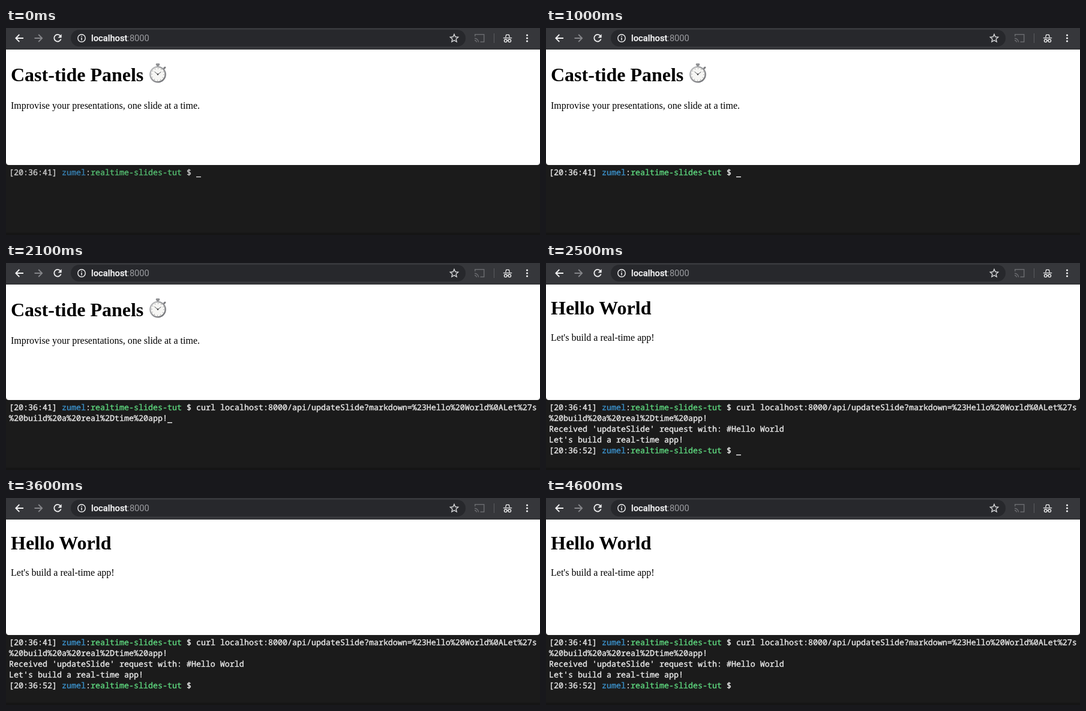
An HTML page for the animation above (4.7 s loop, 890 by 346 pixels).

```html
<!DOCTYPE html>
<html lang="en">
<head>
<meta charset="utf-8">
<title>Live slide update</title>
<style>
  html, body { margin: 0; width: 100%; height: 100%; overflow: hidden; background: #1b1b1b; }
  svg { display: block; width: 890px; height: 346px; }
  text { white-space: pre; }
  .line { fill: none; stroke: #f1f1f2; stroke-width: 1.8; }
  .url { font: 14.65px Roboto, Inter, sans-serif; fill: #9b9ca0; }
  .url tspan { fill: #f4f4f5; stroke: #f4f4f5; stroke-width: .25; font-weight: 500; }
  .page { font: 16px "Liberation Serif", "Times New Roman", serif; }
  .page .title { font-size: 32px; font-weight: bold; }
  .term { font: 500 13.333px "Noto Sans Mono", "DejaVu Sans Mono", monospace; text-rendering: geometricPrecision; }
  .term text, .term tspan { fill: var(--ink); stroke: var(--ink); stroke-width: .4; }
  .term text { --ink: #e8e8e8; }
  .term .user { --ink: #3b8fc7; }
  .term .dir { --ink: #5dd47d; }
</style>
</head>
<body>
<svg viewBox="0 0 890 346">
  <defs>
    <linearGradient id="steel" x1="0" y1="0" x2="1" y2="1">
      <stop offset="0" stop-color="#c3c4c6"/>
      <stop offset="1" stop-color="#6b6c70"/>
    </linearGradient>
  </defs>
  <rect width="890" height="346" fill="#1b1b1b"/>
  <rect y="342" width="890" height="4" fill="#151515"/>

  <g id="toolbar">
    <rect width="890" height="36" fill="#36373b"/>
    <rect y="35" width="890" height="1" fill="#2a2b2e"/>
    <rect x="108" y="3" width="658" height="28" rx="14" fill="#27282c"/>
    <path class="line" d="M29 17H16.5M22.3 11L16.3 17L22.3 23"/>
    <path class="line" d="M47.5 17H60M54.2 11L60.2 17L54.2 23" style="stroke:#85868a"/>
    <path class="line" d="M90.6 13.1A5.8 5.8 0 1 0 91.6 18.5"/>
    <path d="M92.6 10.2V16.2H86.6Z" fill="#f1f1f2"/>
    <circle class="line" cx="126" cy="17" r="6.2" style="stroke-width:1.4"/>
    <path class="line" d="M126 13.2V14.8M126 16V20.6" style="stroke-width:1.5"/>
    <text class="url" x="142" y="22"><tspan>localhost</tspan>:8000</text>
    <path id="star" class="line" style="stroke:#d4d5d7;stroke-width:1.4"/>
    <g class="line" style="stroke:#696a6e;stroke-width:1.5">
      <path d="M781.7 14V10.8H796.7V23.3H790.5"/>
      <path d="M781 17.3A6.5 6.5 0 0 1 787.5 23.8M781 20.5A3.3 3.3 0 0 1 784.3 23.8"/>
    </g>
    <path d="M813.5 9V25" stroke="#5b5c60"/>
    <path class="line" d="M832.6 15.5L833.8 11.4H838.2L839.4 15.5M828.8 16.6H843.2" style="stroke-width:1.3"/>
    <g class="line" style="stroke-width:1.3">
      <circle cx="832.7" cy="21.3" r="2.3"/>
      <circle cx="839.3" cy="21.3" r="2.3"/>
      <path d="M835 20.8Q836 20.1 837 20.8"/>
    </g>
    <path d="M868.5 12V12M868.5 17V17M868.5 22V22" stroke="#f1f1f2" stroke-width="3.2" stroke-linecap="round"/>
  </g>

  <path d="M0 36H890V224Q890 229 885 229H5Q0 229 0 224Z" fill="#fff"/>
  <g class="page" id="firstSlide">
    <text class="title" x="8" y="89">Cast-tide Panels</text>
    <text x="8" y="135">Improvise your presentations, one slide at a time.</text>
    <g id="stopwatch">
      <path d="M253 66V61" stroke="#77787b" stroke-width="3"/>
      <rect x="249.8" y="59.3" width="6.4" height="3.4" rx="1.2" fill="#8f9093"/>
      <path d="M262.5 68.5L265 66" stroke="#77787b" stroke-width="3" stroke-linecap="round"/>
      <circle cx="253" cy="77.6" r="12.7" fill="#f6f6f4" stroke="url(#steel)" stroke-width="2.4"/>
      <circle cx="253" cy="77.6" r="10" fill="none" stroke="#8c8c8c" stroke-width="1.6" stroke-dasharray=".8 4.436"/>
      <path d="M253 77.6L247.5 73M253 77.6L258.5 73.4" stroke="#55565a" stroke-width="1"/>
      <circle cx="253" cy="77.6" r="1.3" fill="#444"/>
    </g>
  </g>
  <g class="page" id="secondSlide">
    <text class="title" x="8" y="86">Hello World</text>
    <text x="8" y="130">Let's build a real-time app!</text>
  </g>

  <g class="term" id="terminal">
    <g id="lines"></g>
    <rect id="cursor" width="8" height="1.6" fill="#d8d8d8"/>
  </g>
</svg>
<script>
const LOOP = 4700, PASTE = 1400, ENTER = 2400, REPLY = 2500;
const CELL = 8, LEFT = 5, ROW = 18, BASELINE = 246;
const $ = id => document.getElementById(id);

const prompt = time =>
  `[${time}] <tspan class="user">zumel</tspan>:<tspan class="dir">realtime-slides-tut</tspan> $ `;

const rows = [
  { row: 0, col: 0, at: 0, html: prompt('20:36:41') },
  { row: 0, col: 39, at: PASTE, html: 'curl localhost:8000/api/updateSlide?markdown=%23Hello%20World%0ALet%27s' },
  { row: 1, col: 0, at: PASTE, html: '%20build%20a%20real%2Dtime%20app!' },
  { row: 2, col: 0, at: REPLY, html: "Received 'updateSlide' request with: #Hello World" },
  { row: 3, col: 0, at: REPLY, html: "Let's build a real-time app!" },
  { row: 4, col: 0, at: REPLY, html: prompt('20:36:52') }
];

$('lines').innerHTML = rows.map(r =>
  `<text x="${LEFT + r.col * CELL}" y="${BASELINE + r.row * ROW}">${r.html}</text>`).join('');
const lines = [...$('lines').children];

const starPoints = Array.from({ length: 10 }, (_, i) => {
  const angle = i * Math.PI / 5, radius = i % 2 ? 3.2 : 7;
  return `${747 + radius * Math.sin(angle)} ${17.4 - radius * Math.cos(angle)}`;
});
$('star').setAttribute('d', `M${starPoints.join('L')}Z`);

const show = (el, on) => el.setAttribute('visibility', on ? 'visible' : 'hidden');

function cursorCell(t) {
  if (t < PASTE) return [39, 0];
  if (t < ENTER) return [33, 1];
  if (t < REPLY) return [0, 2];
  return [39, 4];
}

// The cursor blinks once a second and stays lit while the shell is busy.
function cursorLit(t) {
  const busy = t >= PASTE && t < REPLY + 500;
  return busy || t % 1000 < 500;
}

function render(t) {
  rows.forEach((r, i) => show(lines[i], t >= r.at));
  show($('firstSlide'), t < REPLY);
  show($('secondSlide'), t >= REPLY);
  const [col, row] = cursorCell(t);
  $('cursor').setAttribute('x', LEFT + col * CELL);
  $('cursor').setAttribute('y', BASELINE + 2 + row * ROW);
  show($('cursor'), cursorLit(t));
  $('terminal').setAttribute('opacity', t < 100 ? 0.86 : 1);
}

const start = performance.now();
function tick() {
  render((performance.now() - start) % LOOP);
  requestAnimationFrame(tick);
}
tick();
</script>
</body>
</html>
```
